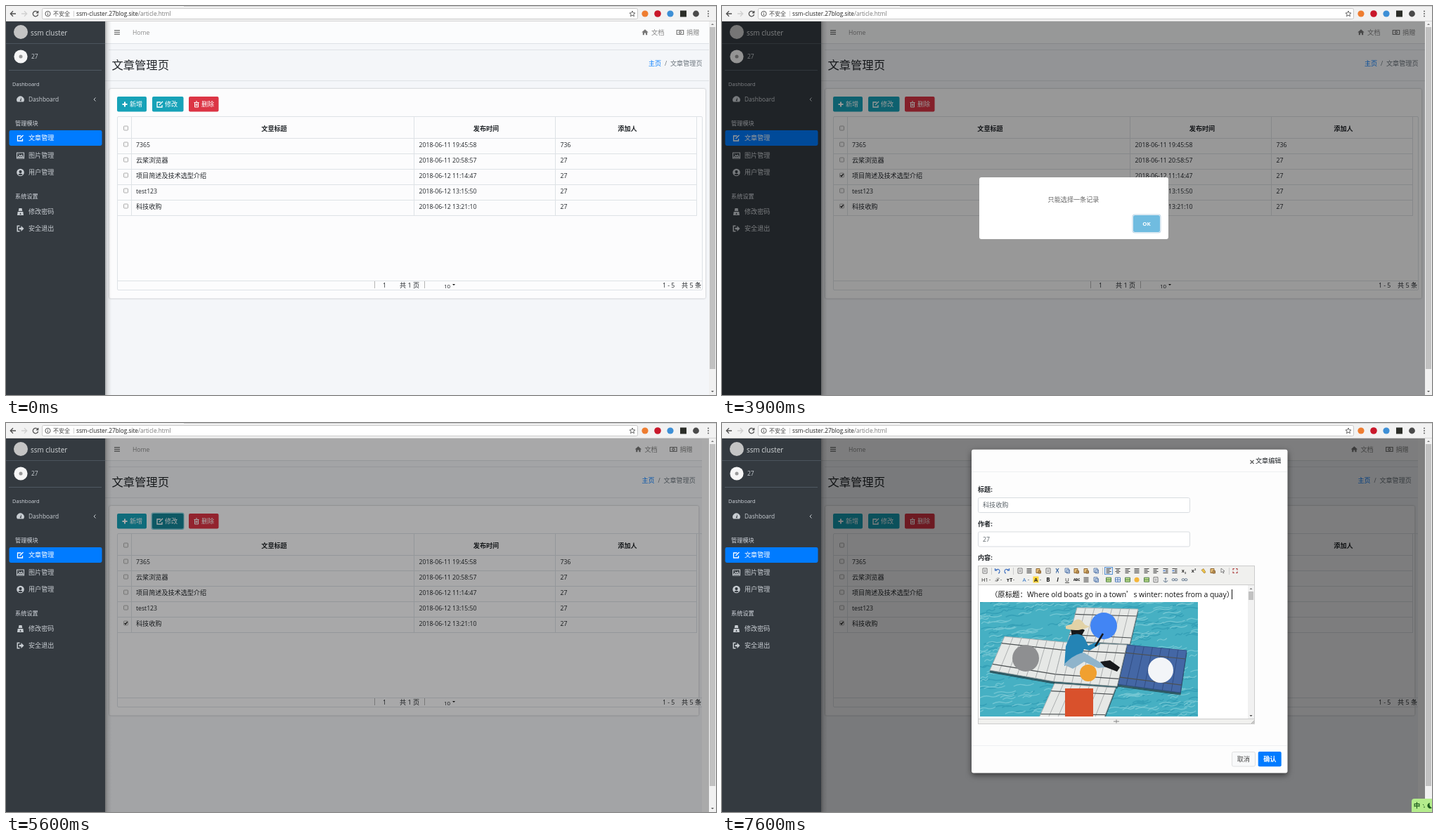
These frames come from a looping animation (1010x554 px, 8000 ms). An HTML page:

```html
<!DOCTYPE html>
<html lang="zh-CN">
<head>
<meta charset="utf-8">
<title>文章管理页</title>
<style>
html, body { margin: 0; width: 100%; height: 100%; overflow: hidden; background: #f4f6f9; }
svg { display: block; width: 1010px; height: 554px; }
text { font-family: "Open Sans", "Noto Sans", "Noto Sans CJK SC", "Noto Sans CJK", sans-serif; white-space: pre; }
.cjk { font-family: "Noto Sans CJK SC", "Noto Sans CJK", sans-serif; }
</style>
</head>
<body>
<svg id="stage" viewBox="0 0 1010 554" xmlns="http://www.w3.org/2000/svg"></svg>
<script>
const LATIN = 8.7, CJK = 9.1;
const INK = '#212529', GRID = '#dee2e6', BLUE = '#007bff', TEAL = '#17a2b8';

const rect = (x, y, w, h, fill, more = '') =>
  `<rect x="${x}" y="${y}" width="${w}" height="${h}" fill="${fill}" ${more}/>`;
const circle = (x, y, r, fill, more = '') =>
  `<circle cx="${x}" cy="${y}" r="${r}" fill="${fill}" ${more}/>`;
const path = (d, stroke, width = 1, fill = 'none', more = '') =>
  `<path d="${d}" stroke="${stroke}" stroke-width="${width}" fill="${fill}" ${more}/>`;
const hline = (x1, x2, y, color = GRID) => rect(x1, y, x2 - x1, 1, color);
const vline = (x, y1, y2, color = GRID, more = '') => rect(x, y1, 1, y2 - y1, color, more);
// y is the vertical middle of the text
const text = (x, y, s, size = CJK, fill = INK, more = '') =>
  `<text x="${x}" y="${(y + size * 0.36).toFixed(2)}" font-size="${size}" fill="${fill}" ${more}>${s}</text>`;
const MID = 'text-anchor="middle" ', BOLD = 'font-weight="700" ';
const group = (id, body) => `<g id="${id}">${body}</g>`;

// [path, stroke width], zero stroke means filled
const ICONS = {
  plus: ['M-3.5 0H3.5M0-3.5V3.5', 2],
  edit: ['M3 1V4H-4V-3H1M-1 1L4-4', 1.3],
  trash: ['M-3.5-2.5H3.5M-2.5-2.5V4H2.5V-2.5M-1-4H1M-.8-1V2.5M.8-1V2.5', 1],
  gauge: ['M-4.5 4A5.3 5.3 0 1 1 4.5 4ZM-.8 2.5L1.5-2.5 1 3Z', 0],
  image: ['M-5-4H5V4H-5ZM-3.5 2.5L-1-.5 .5 1 2-1 3.5 2.5ZM-3-2H-2', 1.1],
  user: ['M0-5.3A5.3 5.3 0 1 1 0 5.3 5.3 5.3 0 1 1 0-5.3ZM0-3A2 2 0 1 0 0 1.2 2 2 0 1 0 0-3ZM-3.4 3Q0 .5 3.4 3Q0 5.5-3.4 3Z', 0],
  agent: ['M-2.8-1L-2-5H2L2.8-1ZM-4.5 5L-3.8 0H3.8L4.5 5ZM0 1L-1 4H1Z', 0],
  exit: ['M-1-4.5H-5V4.5H-1V3H-3.5V-3H-1ZM-2-1.3H1V-4L5 0 1 4V1.3H-2Z', 0],
  home: ['M-4.7 0L0-4.2 4.7 0H3.2V3.7H1V1H-1V3.7H-3.2V0Z', 0],
  money: ['M-4.7-3H4.7V3H-4.7ZM0-1.6A1.6 1.6 0 1 1 0 1.6 1.6 1.6 0 1 1 0-1.6Z', 1.2],
  bars: ['M-4-2.7H4M-4 0H4M-4 2.7H4', 1.2],
  left: ['M1.5-2.5L-1 0 1.5 2.5', 1],
  back: ['M4 0H-3.5M0-3.7L-3.7 0 0 3.7', 1.3],
  reload: ['M3.2-1.8A3.7 3.7 0 1 0 3.6 1M3.7-4V-1.2H1', 1.3],
  star: ['M0-4L1.2-1.2 4-1 1.8 .8 2.5 3.7 0 2.1-2.5 3.7-1.8 .8-4-1-1.2-1.2Z', .9],
  up: ['M-2 1L0-1 2 1Z', 0],
  down: ['M-2-1L0 1 2-1Z', 0],
  cross: ['M-2.5-2.5L2.5 2.5M2.5-2.5L-2.5 2.5', 1.1]
};
const icon = (name, x, y, color, scale = '1') => {
  const [d, width] = ICONS[name];
  return path(d, width ? color : 'none', width, width ? 'none' : color,
    `fill-rule="evenodd" transform="translate(${x} ${y}) scale(${scale})"`);
};

function browserBar() {
  const dots = [7.5, 11, 14.5].map(y => circle(999, y, .9, '#555')).join('');
  return rect(0, 0, 1010, 21, '#f2f2f2') + hline(253, 1010, 0, '#cfcfcf') + hline(0, 1010, 21, '#d4d4d4') +
    icon('back', 10, 11, '#505050') + icon('back', 26, 11, '#d0d0d0', '-1 1') + icon('reload', 42, 11, '#505050') +
    rect(51.5, 3.5, 847, 15, '#fff', 'rx="2" stroke="#c8c8c8"') +
    circle(59.5, 11, 3.6, 'none', 'stroke="#555"') + rect(59, 10.5, 1, 2.6, '#555') + rect(59, 8.7, 1, 1, '#555') +
    text(67, 11, '不安全', 8, '#444') + vline(96, 7, 15, '#d0d0d0') +
    text(100, 11, 'ssm-cluster.27blog.site<tspan fill="#777">/article.html</tspan>', 8.24, '#222') +
    icon('star', 891, 11, '#555') + circle(909, 11, 4.6, '#ee7d31') + circle(927, 11, 4.8, '#c9182b') +
    circle(945, 11, 4.6, '#3d8fd6') + rect(959, 6.5, 9, 9, '#2b2d28') + circle(981.5, 11, 4.4, '#4a4a4a') + dots;
}

function pageScrollbar() {
  return rect(1000, 22, 10, 532, '#f1f1f1') + rect(1001, 30, 8, 487, '#c1c1c1') +
    icon('up', 1005, 26, '#777') + icon('down', 1005, 549, '#505050');
}

function sidebar() {
  const light = '#c8cdd2', item = (y, ico, label, color = light) =>
    icon(ico, 20.5, y, color) + text(32, y, label, CJK, color);
  return rect(141, 21, 9, 533, 'url(#side)') + rect(0, 21, 141, 533, '#343a40') +
    circle(21, 37, 10, '#c4c4c4') + text(35, 38, 'ssm cluster', 9.9, '#d5d8da') + hline(0, 141, 53, '#4b545c') +
    circle(21, 72, 9.6, '#f6f6f6') + circle(21, 72, 2.5, '#999') + text(36, 72, '27', 8.5, light) +
    hline(4, 136, 91, '#4f5962') +
    text(9, 111, 'Dashboard', 7.5, '#d0d4db') + icon('gauge', 20.5, 132.5, light) +
    text(32, 132.5, 'Dashboard', 8.4, light) + icon('left', 126, 133, light) +
    text(13, 167, '管理模块', 8.2, '#d0d4db') + rect(4.5, 177, 132, 22, BLUE, 'rx="2.4"') +
    item(188, 'edit', '文章管理', '#fff') + item(213, 'image', '图片管理') + item(237, 'user', '用户管理') +
    text(13, 271.5, '系统设置', 8.2, '#d0d4db') + item(293, 'agent', '修改密码') + item(317, 'exit', '安全退出');
}

const checkbox = (y, id) => rect(167.5, y - 3, 6, 6, '#f6f6f6', 'rx="1" stroke="#b0b0b0"') +
  (id ? path(`M168.6 ${y}L170 ${y + 1.6} 172.6 ${y - 1.8}`, '#222', 1.3, 'none', `id="${id}"`) : '');

function articleTable() {
  const rows = [
    ['7365', '2018-06-11 19:45:58', '736'],
    ['云桨浏览器', '2018-06-11 20:58:57', '27'],
    ['项目简述及技术选型介绍', '2018-06-12 11:14:47', '27'],
    ['test123', '2018-06-12 13:15:50', '27'],
    ['科技收购', '2018-06-12 13:21:10', '27']
  ];
  const heads = [[381.5, '文章标题'], [683, '发布时间'], [884, '添加人']];
  return rect(158.5, 157.5, 832, 247, 'none', `stroke="${GRID}" rx="1.5"`) +
    [178, 580, 781, 982].map(x => vline(x, 157, 299)).join('') + hline(158, 982, 188) + checkbox(174) +
    heads.map(([x, s]) => text(x, 174.5, s, CJK, INK, MID + BOLD)).join('') +
    rows.map(([title, date, author], i) => {
      const y = 197.5 + 22 * i;
      return hline(158, 982, 210 + 22 * i) + checkbox(y - .5, 'check' + i) +
        text(185, y, title, /^\w/.test(title) ? LATIN : CJK) + text(587.5, y, date, LATIN) + text(788.5, y, author, LATIN);
    }).join('') +
    hline(158, 991, 391) + vline(524, 392, 402, '#b5b5b5') + vline(595, 392, 402, '#b5b5b5') +
    text(538.5, 397.5, '1', LATIN, INK, MID) + text(560, 397.5, '共 1 页') + text(623, 399, '10', 8) +
    icon('down', 637, 397, '#111') + text(934, 397.5, '1 - 5', LATIN) + text(961, 397.5, '共 5 条');
}

function mainPage() {
  const button = (x, w, color, ico, label, id) =>
    rect(x, 129, w, 21.5, color, `rx="2" id="${id}"`) + icon(ico, x + 11, 140, '#fff') + text(x + 18, 140, label, CJK, '#fff');
  return rect(141, 21, 859, 533, '#f4f6f9') + rect(141, 21, 859, 32, '#fbfcfd') + hline(141, 1000, 53) +
    icon('bars', 158, 37.5, '#666') + text(180, 37.5, 'Home', 8.6, '#8a8a8a') +
    hline(146, 1000, 62, '#dfe2e6') + text(150.5, 84, '文章管理页', 16.3) + hline(141, 1000, 106, '#dfe2e6') +
    group('right', icon('home', 909, 37.5, '#777') + text(918, 37.5, '文档', 9.2, '#858585') +
      icon('money', 959, 37.5, '#777') + text(968, 37.5, '捐赠', 9.2, '#858585') +
      text(914, 82, '主页', CJK, BLUE) + text(937, 82, '/', LATIN, '#6c757d') + text(945, 82, '文章管理页', CJK, '#6c757d')) +
    rect(147, 118, 848, 298.5, '#fcfcfd', 'id="card" rx="2" style="filter:drop-shadow(0 .6px 1px rgba(0,0,0,.3))"') +
    rect(206.5, 127.5, 47, 24.5, TEAL, 'id="ring" rx="3" opacity=".5"') +
    button(158, 42, TEAL, 'plus', '新增', 'add') + button(208, 44.5, TEAL, 'edit', '修改', 'modify') +
    button(260, 42.5, '#dc3545', 'trash', '删除', 'remove') + articleTable() +
    rect(990, 21, 10, 533, '#fff', 'id="gutter"');
}

function alertBox() {
  return rect(366, 244, 269, 88, '#fff', 'rx="3"') + text(500, 275.5, '只能选择一条记录', CJK, '#666', MID) +
    rect(583.5, 296.5, 41, 27, '#bcd5e6', 'rx="4"') + rect(584.5, 297.5, 39, 25, '#fff', 'rx="3"') +
    rect(585, 298, 38, 24, '#78cbf2', 'id="ok" rx="2.5"') + text(604, 310.2, 'OK', 7.8, '#fff', MID + BOLD);
}

// Four corners clockwise; slats run from the top edge to the bottom edge
function raft(corners, color, slat) {
  const [a, b, c, d] = corners;
  const mix = (p, q, k) => p.map((v, i) => (v + (q[i] - v) * k).toFixed(1)).join(' ');
  const outline = `M${corners.map(p => p.join(' ')).join('L')}Z`;
  let slats = '';
  for (let i = 1; i < 7; i++) slats += `M${mix(a, b, i / 7)}L${mix(d, c, i / 7)}`;
  const ropes = `M${mix(a, d, .2)}L${mix(b, c, .2)}M${mix(a, d, .82)}L${mix(b, c, .82)}`;
  return path(outline, '#24383e', 1, '#24383e', 'transform="translate(0 3)" opacity=".7"') +
    path(outline, slat, .8, color) + path(slats, slat, .9) + path(ropes, '#4c5052', 1.2);
}

function illustration() {
  let seed = 7;
  const random = () => (seed = seed * 16807 % 2147483647) / 2147483647;
  const waves = (count, color, width) => {
    let d = '';
    for (let i = 0; i < count; i++) {
      const half = 5 + random() * 11, x = 355 + random() * 315, y = 256 + random() * 162;
      d += `M${x.toFixed(1)} ${y.toFixed(1)}q${(half / 2).toFixed(1)}-4 ${half.toFixed(1)}-2t${half.toFixed(1)}-2`;
    }
    return path(d, color, width, 'none', 'opacity=".7"');
  };
  const wood = '#e6e8e6', slat = '#a5a9aa';
  const shirt = '#2484b5', jeans = '#8fb4cb', dark = '#17191c';
  const shape = (d, color) => path(d, 'none', 0, color);
  return `<g clip-path="url(#picture)">` + rect(367, 255, 310, 163, '#46b0c3') +
    waves(200, '#2e9bb3', 1.6) + waves(260, '#86d0db', 1.3) +
    raft([[505, 263], [592, 265], [580, 315], [492, 310]], wood, slat) +
    raft([[402, 304], [486, 312], [472, 368], [381, 352]], wood, slat) +
    raft([[576, 316], [661, 324], [652, 384], [562, 372]], '#4467a5', '#2f4b80') +
    raft([[486, 312], [576, 316], [562, 375], [472, 368]], wood, slat) +
    raft([[473, 371], [560, 377], [542, 424], [449, 424]], wood, slat) +
    circle(543, 289, 19, '#4285f4') + circle(432, 335, 19, '#8e8f91') + circle(624, 352, 18, '#f3f5f8') +
    circle(521, 356, 12, '#f0a030') + rect(488, 378, 40, 40, '#d9512c') +
    shape('M496 294Q506 288 516 295L511 304 498 304Z', dark) +
    shape('M495 303Q507 297 515 305L521 317 535 311 538 315 523 324 515 322 511 332 487 346 489 318Z', shirt) +
    shape('M486 344Q502 328 515 327L538 341 554 342 553 347 535 349 515 340 499 350Z', jeans) +
    shape('M538 340L552 338 566 348 562 354 544 347Z', dark) + path('M531 318L542 300', dark, 2.5) +
    shape('M489 289Q506 282 523 290Q508 298 489 293ZM497 287Q506 272 516 287Z', '#e2d2a6') + '</g>';
}

function editorToolbar() {
  const shapes = {
    d: path('M-3-3.5H3V3.5H-3ZM-1.5-1H1.5M-1.5 1H1.5', '#666', .9, '#fff'),
    u: path('M-3-1Q3-4 3 1Q3 3 1 3.5M-3.5-3.5V-.5H-.5', '#3f70c0', 1.2),
    l: path('M-3.5-3H3.5M-3.5-1H1.5M-3.5 1H3.5M-3.5 3H1.5', '#444', 1),
    c: path('M-3.5-3H3.5M-2-1H2M-3.5 1H3.5M-2 3H2', '#444', 1),
    j: path('M-3.5-3H3.5M-3.5-1H3.5M-3.5 1H3.5M-3.5 3H3.5', '#444', 1),
    i: path('M-3.5-3H3.5M0-1H3.5M0 1H3.5M-3.5 3H3.5', '#444', 1) + path('M-3.5 0H-.5', '#3f70c0', 1.6),
    b: path('M-3-3.5H2V2H-3ZM-1-1.5H3.5V3.5H-1Z', '#5878a8', .9, '#d7e5f5'),
    o: path('M-3-3H2V3H-3ZM0 0H3.5V3.5H0Z', '#8b6331', 1, '#e8c27a'),
    k: path('M-2-3.5L1.5 1.5M2-3.5L-1.5 1.5M-2 2.5H-1M1 2.5H2', '#3c68a0', 1.3),
    y: path('M-3-1L0-3 3 2 1 3.5Z', '#a8803a', .8, '#f0c648'),
    g: path('M-3.5-3H3.5V3H-3.5ZM-3.5 0H3.5', '#50804a', 1, '#bddc88'),
    t: path('M-3.5-3H3.5V3H-3.5ZM-3.5 0H3.5M0-3V3', '#4a78b8', 1, '#fff'),
    s: circle(0, 0, 3.5, '#f4b63a'),
    h: path('M-4 0A2 1.5 0 1 1 0 0 2 1.5 0 1 0 4 0 2 1.5 0 1 0 0 0 2 1.5 0 1 1-4 0', '#667a91', 1),
    a: path('M0-3V3.5M-3 1Q-2 3.5 0 3.5T3 1M-1.5-1.5H1.5', '#667a91', 1),
    f: path('M-3-1V-3H-1M1-3H3V-1M3 1V3H1M-1 3H-3V1', '#b04848', 1.2),
    p: path('M-2-3.5V2.5L-.5 1 1 3.5 2 3 .8 .5H3Z', '#666', .8, '#fff')
  };
  const row = (y, list) => list.split(' ').map(s => {
    const kind = s.slice(-1), flipped = kind === 'r';
    return `<g transform="translate(${parseFloat(s)} ${y}) scale(${flipped ? -1 : 1} 1)">${shapes[flipped ? 'u' : kind]}</g>`;
  }).join('');
  const letter = (x, s, more = BOLD, size = 7.5, color = '#222') => text(x, 223.2, s, size, color, MID + more);
  const script = (x, dy) => text(x, 210.5, `x<tspan font-size="4" dy="${dy}">2</tspan>`, 7, '#333', MID + BOLD);
  return rect(364.5, 203.5, 393, 27, '#f0f0ee', 'stroke="#ccc"') +
    [383, 414, 541, 721].map(x => vline(x, 206, 216, '#ccc')).join('') +
    rect(544.5, 205.5, 11, 10, '#e3ecf6', 'stroke="#5690d2"') + rect(557.5, 205.5, 12, 10, '#e9eff6', 'id="hover" stroke="#5690d2"') +
    row(210.5, '374d 392u 405r 424d 437j 450o 464d 477k 491b 504o 518o 532b 550l 563c 577l 590j 604l 617l 631i 644i 685y 698o 712p 730f') +
    script(657, 1.5) + script(671, -3) +
    letter(374, 'H1', '') + letter(391.5, 'ℱ', 'font-style="italic"') + letter(409, 'тT') +
    [381, 397, 415, 436, 453].map(x => icon('down', x, 223.5, '#555', '.6')).join('') +
    letter(430, 'A', '', 8, '#2b6fc2') + rect(442.5, 218.5, 8, 9, '#ffd83b') + letter(446.5, 'A') + letter(464, 'B', BOLD, 8) +
    letter(477.5, 'I', BOLD + 'font-style="italic"', 8) + letter(491, 'U', 'text-decoration="underline"', 8) +
    letter(504.5, 'ABC', BOLD + 'text-decoration="line-through"', 4.6) +
    row(223.2, '518j 532b 550g 563t 577g 590s 604g 617d 631a 644h 658h');
}

function editModal() {
  const field = (y, label, value, size) => text(364, y, label, CJK, INK, BOLD) +
    rect(364.5, y + 11.5, 301, 21, '#fff', 'rx="2" stroke="#d8dce0"') + text(371, y + 22, value, size, '#5a6268');
  return rect(355, 37.7, 449.5, 460.8, '#fdfdfd', 'rx="3" style="filter:drop-shadow(0 3px 4.5px rgba(0,0,0,.55))"') +
    icon('cross', 754, 55.5, '#555') + text(759, 54, '文章编辑') + hline(355, 804, 69, '#eef0f2') +
    field(95, '标题:', '科技收购', CJK) + field(143.5, '作者:', '27', LATIN) + text(364, 192, '内容:', CJK, INK, BOLD) +
    rect(364.5, 203.5, 393, 225, '#fff', 'stroke="#ccc"') + editorToolbar() +
    text(555, 244.5, '（原标题：Where old boats go in a town<tspan class="cjk">’</tspan>s winter: notes from a quay）', 10.4, '#111', MID) +
    vline(725, 237, 251, '#111', 'id="caret"') + illustration() +
    rect(748, 231, 9, 190, '#f1f1f1') + rect(749, 240, 7, 12, '#c1c1c1') +
    icon('up', 752.5, 236, '#777') + icon('down', 752.5, 417, '#444') +
    rect(365, 421, 392, 7, '#f0f0ee') + hline(365, 757, 421, '#ccc') + path('M557 425H565M561 422.5V427.5', '#888') +
    path('M753 428L757 424M755 428L757 426', '#888', .8) + hline(355, 804, 459, '#eef0f2') +
    rect(725.5, 468.5, 33, 20.5, '#f8f9fa', 'rx="2" stroke="#dfe0e1"') + text(741.8, 478.8, '取消', CJK, '#444', MID) +
    rect(762.7, 468, 33, 21.3, BLUE, 'rx="2"') + text(779.3, 478.8, '确认', CJK, '#fff', MID + BOLD);
}

const inputBadge = () => rect(981, 535, 34, 24, '#b4ec8c', 'rx="4"') +
  text(988.5, 545, '中', 9.5, '#1c5a1c', MID + BOLD) + path('M997 543L998.5 544.5M999 546V548', '#1c5a1c') +
  path('M1007 541A4 4 0 1 0 1010 548A5 5 0 0 1 1007 541Z', 'none', 0, '#1c5a1c');

document.getElementById('stage').innerHTML =
  `<defs><linearGradient id="side"><stop offset="0" stop-opacity=".28"/><stop offset=".4" stop-opacity=".1"/><stop offset="1" stop-opacity="0"/></linearGradient>
  <clipPath id="picture"><rect x="367" y="255" width="310" height="163"/></clipPath></defs>` +
  mainPage() + rect(141, 21, 859, 533, '#000', 'id="backdrop"') + sidebar() + group('modal', editModal()) +
  rect(0, 21, 1000, 533, '#000', 'id="shade"') + group('alert', alertBox()) +
  browserBar() + pageScrollbar() + group('badge', inputBadge());

const $ = id => document.getElementById(id);
const set = (id, name, value) => $(id).setAttribute(name, value);
const show = (id, on) => set(id, 'visibility', on ? 'visible' : 'hidden');
const clamp = x => Math.min(1, Math.max(0, x));
const easeOut = x => 1 - (1 - clamp(x)) ** 2;
const between = (t, a, b) => t >= a && t < b;

// Pop-in: grows past full size, dips, settles
function popScale(k) {
  const stops = [[0, .5], [.45, 1.05], [.8, .95], [1, 1]];
  const i = Math.max(1, stops.findIndex(s => s[0] >= k));
  const [[k0, v0], [k1, v1]] = [stops[i - 1], stops[i]];
  return v0 + (v1 - v0) * (k - k0) / (k1 - k0);
}

function render(time) {
  const t = Math.floor(time / 100) * 100;
  [0, 1, 3].forEach(i => show('check' + i, false));
  show('check4', t >= 1100);
  show('check2', between(t, 2300, 4600));

  const pop = clamp((t - 2950) / 300);
  set('shade', 'opacity', .4 * (t < 3900 ? easeOut(pop) : 1 - easeOut((t - 3900) / 300)));
  set('alert', 'opacity', t < 3900 ? easeOut(pop * 1.5) : 1 - easeOut((t - 3900) / 200));
  set('alert', 'transform', `translate(500.5 288) scale(${popScale(pop)}) translate(-500.5 -288)`);
  set('ok', 'fill', t < 3900 ? '#78cbf2' : '#70bce0');

  const hover = between(t, 5000, 5700) ? clamp((t - 4930) / 150) : 0;
  set('modify', 'fill', hover === 0 ? TEAL : hover < 1 ? '#1592a6' : '#138496');
  show('ring', between(t, 5500, 5900));

  const open = t >= 5500;
  set('right', 'transform', `translate(${open ? -9.6 : 0})`);
  set('card', 'width', open ? 838.4 : 848);
  show('gutter', open);
  set('backdrop', 'opacity', .5 * clamp((t - 5500) / 150));
  show('modal', t >= 5800);
  set('modal', 'transform', `translate(0 ${-29 * (1 - easeOut((t - 5800) / 200))})`);
  show('hover', between(t, 5900, 6200));
  show('caret', t >= 7600);
  show('badge', t >= 7600);
}

const start = performance.now();
function tick() {
  render((performance.now() - start) % 8000);
  requestAnimationFrame(tick);
}
tick();
</script>
</body>
</html>
```
